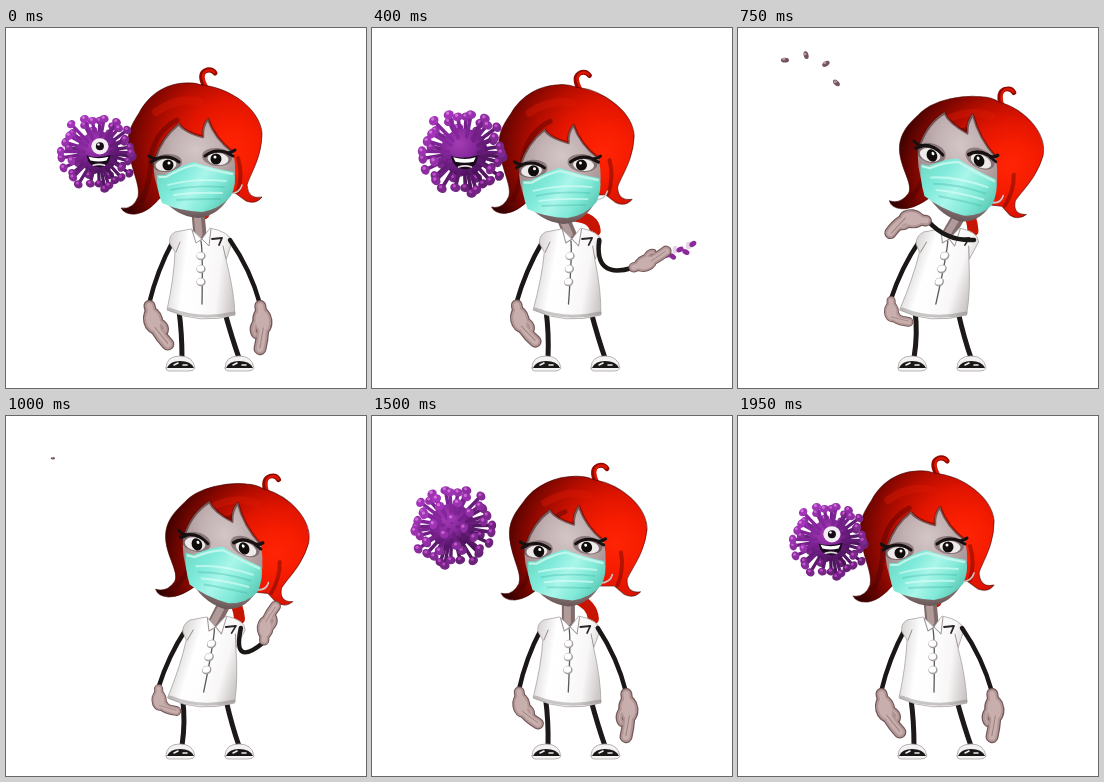
Write an HTML page with a canvas that moves like this. It is 360 px wide and 360 px high and loops after 2000 ms.

```html
<!DOCTYPE html>
<html lang="en">
<head>
<meta charset="utf-8">
<title>Masked girl and virus</title>
<style>
html, body { margin: 0; width: 100%; height: 100%; overflow: hidden; background: #fff; }
canvas { display: block; width: 100vw; height: 100vh; }
</style>
</head>
<body>
<canvas id="stage" width="360" height="360"></canvas>
<script>
const ctx = document.getElementById('stage').getContext('2d');
const LOOP = 2000, STEP = 50, HIT = 600;

// Landmarks in the upright and the leaning pose.
const HAIR = { // left tip, right tip, top curl
  upright: [117, 181, 249, 172, 203, 42],
  leaning: [153, 174, 281, 188, 271, 61]
};
const FACE = { // left eye, right eye, chin
  upright: [160, 137, 212, 130, 192, 188],
  leaning: [192, 127, 243, 132, 221, 191]
};
const ARM = { // wrist x, wrist y, hand angle, finger curl, elbow bend, hand size
  rest: [254, 276, 82, .25, -4, 1],
  hold: [260, 240, -20, -.2, 22, .85],
  strike: [190, 193, -172, -.8, -8, .95],
  raise: [258, 226, -85, .4, 26, .85],
  leftRest: [143, 276, 76, -.35, 3, 1],
  leftLean: [153, 271, 88, -1.1, 3, .75]
};
const GESTURES = [[0, 'rest'], [400, 'hold'], [550, 'hold'], [680, 'strike'], [760, 'strike'],
  [1000, 'raise'], [1120, 'hold'], [1340, 'rest'], [LOOP, 'rest']];

const lerp = (a, b, p) => a + (b - a) * p;
const mix = (a, b, p) => a.map((v, i) => lerp(v, b[i], p));
const rand = n => { const v = Math.sin(n * 127.1 + 4.7) * 43758.5453; return v - Math.floor(v); };
function smooth(t, from, to) {
  const p = Math.max(0, Math.min(1, (t - from) / (to - from)));
  return p * p * (3 - 2 * p);
}
function gesture(t) {
  const i = GESTURES.findIndex(g => g[0] > t);
  const [from, a] = GESTURES[i - 1], [to, b] = GESTURES[i];
  return mix(ARM[a], ARM[b], smooth(t, from, to));
}

const basis = ([x, y, u, v, m, n]) => new DOMMatrix([u - x, v - y, m - x, n - y, x, y]);
function warp(from, to, paint) {
  const m = basis(to).multiply(basis(from).inverse());
  ctx.save();
  ctx.transform(m.a, m.b, m.c, m.d, m.e, m.f);
  paint();
  ctx.restore();
}
function fill(d, color) { ctx.fillStyle = color; ctx.fill(new Path2D(d)); }
function line(d, color, width) {
  ctx.strokeStyle = color; ctx.lineWidth = width; ctx.stroke(new Path2D(d));
}
function oval(x, y, rx, ry, color, angle = 0) {
  ctx.fillStyle = color;
  ctx.beginPath(); ctx.ellipse(x, y, rx, ry, angle, 0, 7); ctx.fill();
}
function shade(g, stops) {
  stops.forEach((c, i) => g.addColorStop(i / (stops.length - 1), c));
  return g;
}
const across = (x0, y0, x1, y1, ...stops) => shade(ctx.createLinearGradient(x0, y0, x1, y1), stops);
const around = (x, y, r, ...stops) => shade(ctx.createRadialGradient(x, y, 0, x, y, r), stops);

// The back of the head swells to the left as the head turns.
function hair(turn) {
  const w = 13 * turn;
  line('M200 61Q192 47 199 43Q205 40 209 45', '#8e0a00', 5);
  line('M201 59Q194 47 200 43Q205 41 208 44', '#e01500', 2.5);
  const shape = `M196 57C226 60 254 82 256 105C256 130 244 146 241 157Q242 172 256 169
    Q250 177 240 173L229 165L154 170C148 177 141 184 130 186Q119 187 115 180Q127 182 132 169
    C135 157 ${124 - w} 140 ${122 - w} 117C${121 - w} 103 ${128 - w} 93 ${133 - w} 85
    C${143 - w} 66 160 56 178 55Q188 54 196 57Z`;
  fill(shape, around(226, 122, 122, '#ff2404', '#f71d00', '#e21500', '#b50d00', '#780600', '#300100'));
  line(shape, 'rgba(70,0,0,.6)', 1);
  line('M171 92Q150 103 145 128Q145 153 136 173', 'rgba(70,0,0,.4)', 5);
  line('M232 130Q237 146 232 164', 'rgba(80,0,0,.4)', 4);
  line('M150 84Q172 68 194 74', 'rgba(220,25,5,.4)', 8);
}

function eye(x, y, side) {
  ctx.save();
  ctx.translate(x, y);
  ctx.scale(side, 1);
  oval(0, -1, 15, 9, 'rgba(70,50,55,.45)', .1);
  oval(1, 1, 10.5, 6, '#eeeaea', .1);
  oval(-1, 1, 5.5, 5.5, '#100c0c');
  oval(-2, -1, 1.5, 1.5, '#fff');
  line('M-12 -2Q-3 -9 8 -6Q13 -4 18 -8M10 -5L16 -2', '#171011', 3);
  ctx.restore();
}

function face() {
  fill(`M148 132Q155 109 173 95Q178 104 197 109Q195 98 202 90Q208 110 227 124
    Q232 146 226 164Q214 188 192 190Q168 188 155 168Q146 150 148 132Z`,
    around(190, 122, 72, '#d3c6c6', '#c2b1b2', '#a28f90', '#5c4a4b'));
  line('M149 131Q156 109 173 96Q178 104 197 109Q196 99 202 91Q209 111 227 124', 'rgba(50,5,5,.5)', 2.5);
  eye(161, 136, -1);
  eye(211, 130, 1);
  line('M224 166Q234 165 236 157', '#c9c9c9', 1.6);
  fill(`M151 147L159 147Q176 137 188 134Q208 141 228 144Q231 155 225 168
    Q214 181 196 184Q173 183 156 175Q150 160 151 147Z`,
    across(158, 140, 218, 182, '#6fdcc6', '#7feada', '#a9f6ea', '#80e9d7', '#58c6b2'));
  line('M153 149L160 149Q177 139 189 137Q207 143 226 146', '#c2f6ec', 2);
  for (let i = 0; i < 4; i++)
    line(`M${162 + i * 3} ${157 + i * 5}Q188 ${150 + i * 7} ${220 - i * 2} ${153 + i * 6}`,
      i % 2 ? 'rgba(60,180,160,.35)' : 'rgba(225,255,250,.6)', 1.8);
}

function coat(lean) {
  ctx.save();
  ctx.transform(1, 0, -lean / 78, 1, lean * 285 / 78, 0);
  const shape = `M185 201L169 204Q162 208 164 216L169 224Q168 250 161 282Q194 297 229 287
    Q228 262 220 232L226 214Q224 204 204 200L196 211Z`;
  fill(shape, across(162, 240, 230, 248, '#dcd8d8', '#fff', '#fdfdfd', '#f8f6f6', '#cdc8c8'));
  line(shape, '#aaa4a4', .8);
  line('M186 202L190 215L196 211L203 218L205 201M170 224L174 214M220 231L217 218', '#9a9393', 1);
  line('M195 213Q197 225 196 276', '#5d5757', 1.3);
  line('M206 211L216 210L213 217', '#2b2525', 1.8);
  for (let y = 228; y < 260; y += 13) {
    oval(195, y, 4.6, 4.3, '#a39d9d');
    oval(194.5, y - .5, 3.6, 3.2, '#fff');
  }
  line('M163 281Q194 293 228 285', 'rgba(120,112,112,.4)', 3);
  ctx.restore();
}

function legs(lean) {
  const hip = lean * .25;
  line(`M${173 + hip} 283Q${176 + hip} 305 176 330`, '#1d1919', 5);
  line(`M${219 + hip / 3} 285Q226 310 233 330`, '#1d1919', 5);
  for (const x of [174, 233]) {
    ctx.save();
    ctx.translate(x, 336);
    const shoe = 'M-14 4Q-14 -8 0 -8Q13 -8 15 4Q14 7 9 7H-11Q-14 7 -14 4Z';
    fill(shoe, '#f4f2f2');
    line(shoe, '#a8a2a2', .8);
    fill('M-13 4Q-10 -3 0 -3Q11 -3 14 4Z', '#1a1717');
    line('M-6 1L-2 -1M3 1H7', '#eee', 1.6);
    ctx.restore();
  }
}

function shard(size) {
  for (let i = 0; i < 7; i++)
    oval(44 + i * 5.5, Math.sin(i * 2) * 4, 4.5, 3, i % 3 === 2 ? '#e6d3e6' : '#8c2a9c', i);
}

// A rounded palm with curled fingers and a thumb.
function hand(x, y, angle, curl, size, grip) {
  ctx.save();
  ctx.translate(x, y);
  ctx.rotate(angle * Math.PI / 180);
  ctx.scale(size, size);
  if (grip) shard();
  const tipX = 20 + 25 * Math.cos(curl), tipY = 25 * Math.sin(curl);
  const fingers = `M16 0Q28 0 ${tipX} ${tipY}`, thumb = `M14 3Q22 ${curl < 0 ? -13 : 13} 30 ${curl < 0 ? -9 : 9}`;
  const layers = [['#715657', 0], ['#b29695', 1.2], ['#c8afad', 3.2]];
  for (const [color, inset] of layers) {
    line('M2 0L16 0', color, 12 - inset * 2);
    oval(17, 0, 14 - inset, 10 - inset, color);
    line(fingers, color, 13 - inset * 2);
    line(thumb, color, 7.5 - inset * 2);
  }
  line(`M24 0L${tipX - 1} ${tipY}`, 'rgba(90,62,62,.4)', 1);
  ctx.restore();
}

function arm(sx, sy, [wx, wy, angle, curl, bend, size], grip) {
  const dx = wx - sx, dy = wy - sy, reach = Math.hypot(dx, dy);
  const ex = (sx + wx) / 2 - dy / reach * bend * 1.5, ey = (sy + wy) / 2 + dx / reach * bend * 1.5;
  line(`M${sx} ${sy}Q${ex} ${ey} ${wx} ${wy}`, '#1b1717', 4.5);
  hand(wx, wy, angle, curl, size, grip);
}

// Spikes spread evenly over a sphere, leaving the face free.
const COUNT = 60;
const SPIKES = Array.from({ length: COUNT }, (_, i) => {
  const y = 1 - (2 * i + 1) / COUNT, r = Math.sqrt(1 - y * y);
  return { x: r * Math.cos(i * 2.4), y, z: r * Math.sin(i * 2.4), len: 32 + rand(i) * 9 };
}).filter(s => s.z < .6);

function spike(s) {
  const x = s.x * s.len, y = s.y * s.len, light = 33 + s.z * 5 - s.y * 6 - s.x * 5;
  line(`M${s.x * 15} ${s.y * 15}L${x} ${y}`, `hsl(288 62% ${light - 3}%)`, 3.4);
  oval(x, y, 4, 4.8, `hsl(290 56% ${light + 5}%)`, Math.atan2(y, x));
  oval(x - 1, y - 1.5, 1.6, 1.6, `hsl(295 55% ${light + 24}%)`);
}

function virusFace(awake) {
  if (awake) {
    oval(2, -6, 9, 8.5, '#f4eef4');
    oval(2, -6, 4.2, 4.2, '#160c18');
    oval(.5, -8, 1.3, 1.3, '#fff');
  }
  fill('M-12 4Q1 7 13 3Q12 16 1 16Q-10 16 -12 4Z', '#17091a');
  fill('M-10 5Q1 8 11 5L9 9Q1 11 -8 9Z', '#fff');
  line('M-5 14Q1 12 7 14', '#e5d9e5', 1.6);
}

function virus(t) {
  const swell = smooth(t, 0, 400), grown = smooth(t, 1200, 1480), back = smooth(t, 1500, 1950);
  const whole = t < HIT;
  const reach = whole ? lerp(40, 45, swell) : lerp(43, 40, back) * grown;
  const yaw = whole ? 0 : Math.PI * (.5 + grown / 2 + back);
  const c = Math.cos(yaw), s = Math.sin(yaw);
  const turned = SPIKES.map(p => ({ ...p, x: p.x * c + p.z * s, z: p.z * c - p.x * s }))
    .sort((a, b) => a.z - b.z);
  ctx.save();
  ctx.translate(whole ? 92 : lerp(80, 92, back), whole ? 124 : lerp(110, 124, back));
  ctx.scale(reach / 42, reach / 42);
  turned.filter(p => p.z < 0).forEach(spike);
  oval(0, 0, 22, 22, around(-5, -8, 30, '#a53cb4', '#86289c', '#4e1062'));
  turned.filter(p => p.z >= 0).forEach(spike);
  if (c > .1) {
    ctx.translate(s * 20, 0);
    ctx.scale(c, 1);
    virusFace(!whole || swell < .5);
  }
  ctx.restore();
}

function bit(x, y, size, i, color = '#755460') {
  oval(x, y, size, size * .6, color, i * 1.3);
  oval(x - size * .3, y - size * .3, size * .4, size * .3, '#b99aa5');
}

// Fragments fly to an arc at the upper left, then all but one vanish.
function burst(t) {
  const out = smooth(t, HIT - 90, 740), fade = smooth(t, 750, 1000);
  for (let i = 0; t < 740 && i < 18; i++) {
    const d = (20 + rand(i) * 50) * out;
    bit(lerp(92, 70, out) + Math.cos(i * 2.4) * d, lerp(124, 75, out) + Math.sin(i * 2.4) * d,
      9 * (1 - out) + 1, i, '#84308f');
  }
  for (let i = 0; i < 4; i++) {
    const a = i * .65 - 2.13, size = 4 - fade * (i ? 6 : 2);
    if (size > 0)
      bit(lerp(92, 65 + 34 * Math.cos(a), out), lerp(124, 61 + 34 * Math.sin(a), out) + 10 * fade, size, i);
  }
}

function gather(t) {
  const near = smooth(t, 1100, 1250), merge = smooth(t, 1250, 1400);
  for (let i = 0; i < 7; i++) {
    const away = 30 * (1 - near);
    const x = 58 + i * 7 + Math.cos(i * 2.1) * away, y = 122 + Math.sin(i * 2.1) * (away + 3);
    const size = (5 - Math.abs(i - 4)) * near + 1;
    bit(lerp(x, 80, merge), lerp(y, 112, merge), size, i, merge > .3 ? '#7d2c8c' : '#755460');
  }
}

function draw(t) {
  ctx.fillStyle = '#fff';
  ctx.fillRect(0, 0, 360, 360);
  ctx.lineCap = ctx.lineJoin = 'round';

  const turn = smooth(t, 300, 750) * (1 - smooth(t, 850, 1980));
  const tilt = turn * turn; // face and body follow the hair late
  const nod = smooth(t, 0, 400) * (1 - smooth(t, 400, 700));
  const lean = 16 * tilt + 4 * nod;
  const look = mix(FACE.upright, FACE.leaning, tilt).map((v, i) => v + (i % 2 ? 6 : -1) * nod);
  const [chinX, chinY] = look.slice(4);
  const tail = smooth(t, 150, 400) * (1 - smooth(t, 1550, 1900));
  const tailX = lerp(198, 219 + lean, tail), tailY = lerp(190, 207, tail);

  legs(lean);
  line(`M${chinX + 8} ${chinY - 6}Q${tailX - 1} ${tailY - 18} ${tailX} ${tailY - 4}`, '#c81403', 11);
  line(`M${chinX} ${chinY - 3}L${194 + lean} 207`, '#806a6a', 13);
  line(`M${chinX - 1} ${chinY - 3}L${193 + lean} 206`, '#b09a9a', 7);
  arm(167 + lean * .9, 213, mix(ARM.leftRest, ARM.leftLean, turn));
  coat(lean);
  warp(HAIR.upright, mix(HAIR.upright, HAIR.leaning, turn), () => hair(turn));
  warp(FACE.upright, look, face);
  if (t < HIT || t > 1250) virus(t);
  if (t >= HIT && t < 1050) burst(t);
  if (t >= 1150 && t < 1380) gather(t);
  arm(224 + lean * .75, 212, gesture(t), t >= 300 && t < HIT);
}

const start = performance.now();
function tick(now) {
  const t = Math.max(0, now - start) % LOOP;
  draw(Math.floor(t / STEP) * STEP);
  requestAnimationFrame(tick);
}
draw(0);
requestAnimationFrame(tick);
</script>
</body>
</html>
```
